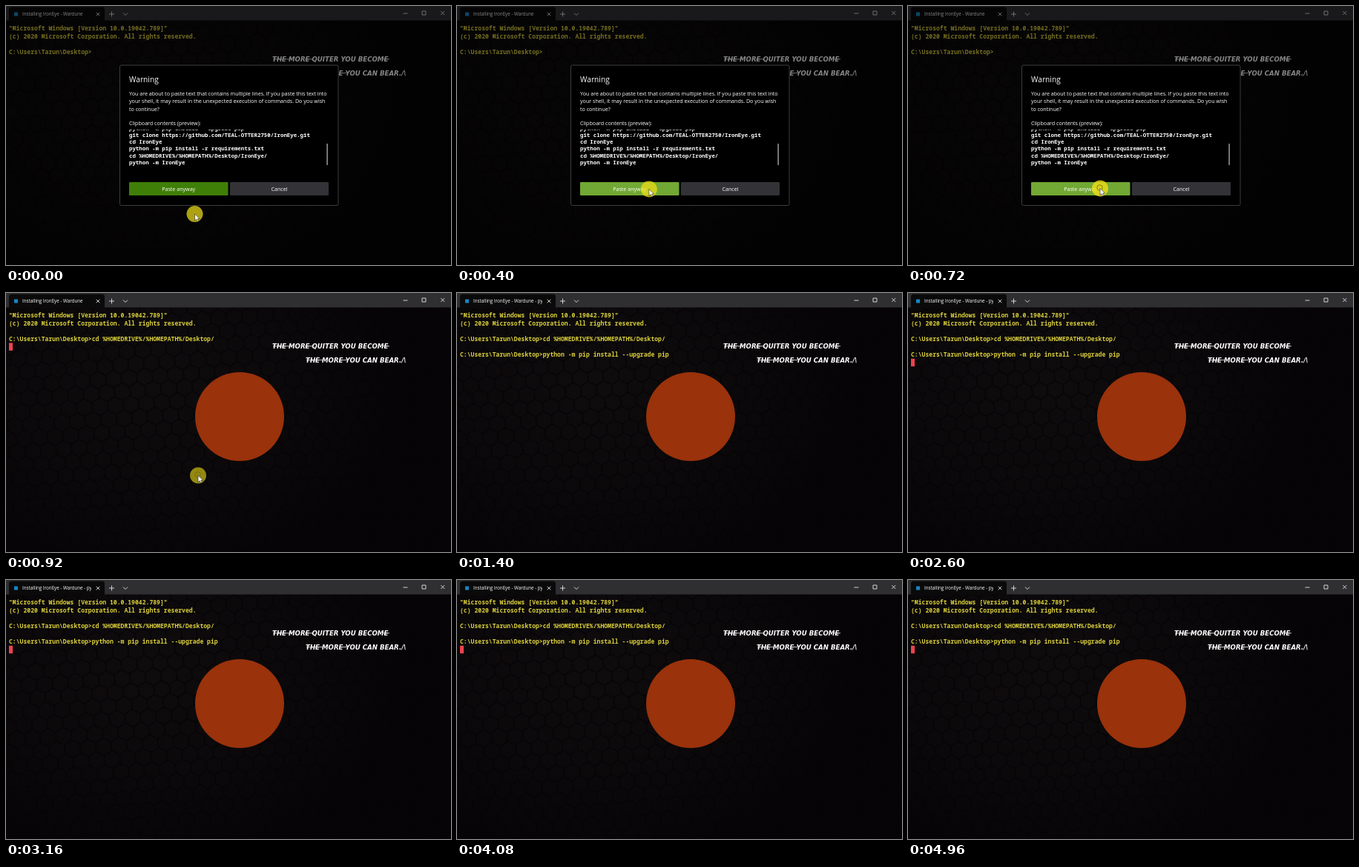
An HTML page for the animation above (5000 ms loop, 600 by 350 pixels).

```html
<!DOCTYPE html>
<html lang="en">
<head>
<meta charset="utf-8">
<title>Terminal paste</title>
<style>
  html, body { margin: 0; width: 100%; height: 100%; overflow: hidden; background: #050305; }
  svg { display: block; width: 600px; height: 350px; }
  text { white-space: pre; }
  .ui { font-family: "Open Sans", "Noto Sans", sans-serif; font-size: 7.13px; fill: #fff; }
  .mono { font-family: "Noto Sans Mono", "DejaVu Sans Mono", monospace; font-weight: 600; }
  #term { font-size: 8.1px; fill: #dacf3c; }
  #clip { font-size: 7.4px; fill: #fff; }
  #quote { font: italic bold 8.65px "DejaVu Sans", sans-serif; fill: #fff; }
  .icon { fill: none; stroke: #e4e4e4; stroke-width: .9; }
</style>
</head>
<body>
<svg viewBox="0 0 600 350">
  <defs>
    <pattern id="hex" width="21" height="36" patternUnits="userSpaceOnUse" patternTransform="rotate(-4)">
      <rect width="21" height="36" fill="#0f0c0e"/>
      <path d="M10.5 0V6L0 12V24L10.5 30V36M10.5 30L21 24V12L10.5 6" fill="none" stroke="#060406" stroke-width="1.5"/>
    </pattern>
    <radialGradient id="shade" gradientUnits="userSpaceOnUse" cx="190" cy="125" r="340" gradientTransform="translate(0 30) scale(1 .76)">
      <stop offset="0" stop-color="#050305" stop-opacity="0"/>
      <stop offset=".5" stop-color="#050305" stop-opacity=".35"/>
      <stop offset="1" stop-color="#050305" stop-opacity=".9"/>
    </radialGradient>
    <clipPath id="tabClip"><rect x="20" y="2" width="95" height="17"/></clipPath>
    <clipPath id="clipBox"><rect x="160" y="167.3" width="270" height="56"/></clipPath>
  </defs>

  <rect y="19" width="600" height="331" fill="url(#hex)"/>
  <rect y="19" width="600" height="331" fill="url(#shade)"/>
  <circle cx="315" cy="167" r="60" fill="#9a320b"/>

  <g id="quote">
    <text x="359" y="74.8">THE MORE QUITER YOU BECOME</text>
    <text x="404" y="93.6">THE MORE YOU CAN BEAR./\</text>
    <path d="M360 71.8H384M403 71.8H414M508 71.8H517M405 90.6H428M449 90.6H459" stroke="#fff" stroke-width=".8"/>
  </g>

  <g id="term" class="mono"></g>
  <rect id="caret" x="4" width="5" height="10.4" fill="#f0424f"/>

  <rect width="600" height="19.5" fill="#2f2e31"/>
  <path d="M4 20V5Q4 1.5 7.5 1.5H129.5Q133 1.5 133 5V20Z" fill="#0b0a0b"/>
  <rect x="11" y="8.5" width="5" height="5" fill="#1687c4"/>
  <g clip-path="url(#tabClip)"><text id="tab" class="ui" x="22" y="13.4" style="font-size:6.25px"></text></g>
  <path class="icon" d="M121.7 8.7L126.3 13.3M126.3 8.7L121.7 13.3M139 11H146M142.5 7.5V14.5M158 9.5L161 12.5L164 9.5M535.5 10H541.5M561 7H566V12H561ZM586.3 7L591.3 12M591.3 7L586.3 12"/>

  <g id="modal">
    <rect width="600" height="350" fill="#000" opacity=".48"/>
    <rect x="153.5" y="80" width="294.5" height="189.5" rx="2" fill="#000" stroke="#454545" stroke-width=".9"/>
    <g class="ui" id="info">
      <text x="166" y="102.7" style="font-size:10.2px">Warning</text>
    </g>
    <g id="clip" class="mono" clip-path="url(#clipBox)"></g>
    <rect x="432.4" y="186" width="1.4" height="29" fill="#a5a5a5"/>
    <rect id="paste" x="166" y="238" width="133.5" height="18" rx="1"/>
    <rect x="302" y="238" width="133" height="18" rx="1" fill="#333236"/>
    <g class="ui" text-anchor="middle">
      <text x="232.7" y="249.5">Paste anyway</text>
      <text x="368.5" y="249.5">Cancel</text>
    </g>
  </g>

  <g id="mouse">
    <circle id="halo" r="11" fill="#f0df18"/>
    <circle id="ring" cx="-.5" cy="-1" r="3.7" fill="none" stroke="#6f690c"/>
    <path d="M0 0V9L2.2 7.2L3.7 10.4L5.2 9.7L3.8 6.6H6.6Z" fill="#fff" stroke="#222" stroke-width=".6"/>
  </g>
</svg>
<script>
const LOOP = 5000;
const BLINK = 400;
const PRESS = 680, PASTED = 860, UPGRADE = 1080, RENAMED = 1200, GONE = 1320;

const $ = id => document.getElementById(id);
const set = (id, attrs) => { for (const k in attrs) $(id).setAttribute(k, attrs[k]); };
const shown = on => on ? "visible" : "hidden";

function addText(parent, x, y, str) {
  const el = document.createElementNS("http://www.w3.org/2000/svg", "text");
  el.setAttribute("x", x);
  el.setAttribute("y", y);
  el.textContent = str;
  return $(parent).appendChild(el);
}

const PROMPT = "C:\\Users\\Tarun\\Desktop>";
const rowY = row => 32.8 + row * 10.7;
// row, time of appearance, text
const lines = [
  [0, 0, '"Microsoft Windows [Version 10.0.19042.789]"'],
  [1, 0, "(c) 2020 Microsoft Corporation. All rights reserved."],
  [3, 0, PROMPT],
  [3, PASTED, " ".repeat(PROMPT.length) + "cd %HOMEDRIVE%/%HOMEPATH%/Desktop/"],
  [5, UPGRADE, PROMPT + "python -m pip install --upgrade pip"]
].map(([row, at, str]) => ({ at, el: addText("term", 4, rowY(row), str) }));

[
  [120.6, "You are about to paste text that contains multiple lines. If you paste this text into"],
  [131, "your shell, it may result in the unexpected execution of commands. Do you wish"],
  [141.5, "to continue?"],
  [161, "Clipboard contents (preview):"]
].forEach(([y, str]) => addText("info", 166, y, str));

[
  "python -m pip install --upgrade pip",
  "git clone https://github.com/TEAL-OTTER2750/IronEye.git",
  "cd IronEye",
  "python -m pip install -r requirements.txt",
  "cd %HOMEDRIVE%/%HOMEPATH%/Desktop/IronEye/",
  "python -m IronEye"
].forEach((str, i) => addText("clip", 166, 167.6 + i * 9.25, str));

// time, x, y
const path = [[0, 254.5, 281], [40, 254.5, 281], [440, 259, 246.5], [1040, 259, 246.5], [GONE, 262, 366]];
const ease = p => p * p * (3 - 2 * p);
const ramp = (t, a, b) => Math.min(1, Math.max(0, (t - a) / (b - a)));

function mouseAt(t) {
  const i = path.findIndex(p => p[0] > t);
  if (i < 0) return path[path.length - 1].slice(1);
  const [t0, x0, y0] = path[i - 1], [t1, x1, y1] = path[i];
  const p = ease(ramp(t, t0, t1));
  return [x0 + (x1 - x0) * p, y0 + (y1 - y0) * p];
}

function draw(t) {
  const [x, y] = mouseAt(t);
  set("mouse", { transform: `translate(${x} ${y})`, visibility: shown(t < GONE) });
  set("halo", { opacity: t < PRESS ? .72 : t < 800 ? .8 : .6 });
  set("ring", { opacity: t >= PRESS && t < 980 ? .8 : 0 });
  set("paste", { fill: y < 256 ? "#72a834" : "#3f7f08" });
  set("modal", { opacity: 1 - ramp(t, 780, 880) });

  lines.forEach(l => l.el.setAttribute("visibility", shown(t >= l.at)));
  set("caret", {
    y: rowY(t < UPGRADE ? 4 : 6) - 8.2,
    visibility: shown(t >= PASTED && (t + 160) % (2 * BLINK) < BLINK)
  });
  $("tab").textContent = "Installing IronEye - Wardune" + (t >= RENAMED ? " - python" : "");
}

const start = performance.now();
function tick() {
  draw((performance.now() - start) % LOOP);
  requestAnimationFrame(tick);
}
tick();
</script>
</body>
</html>
```
